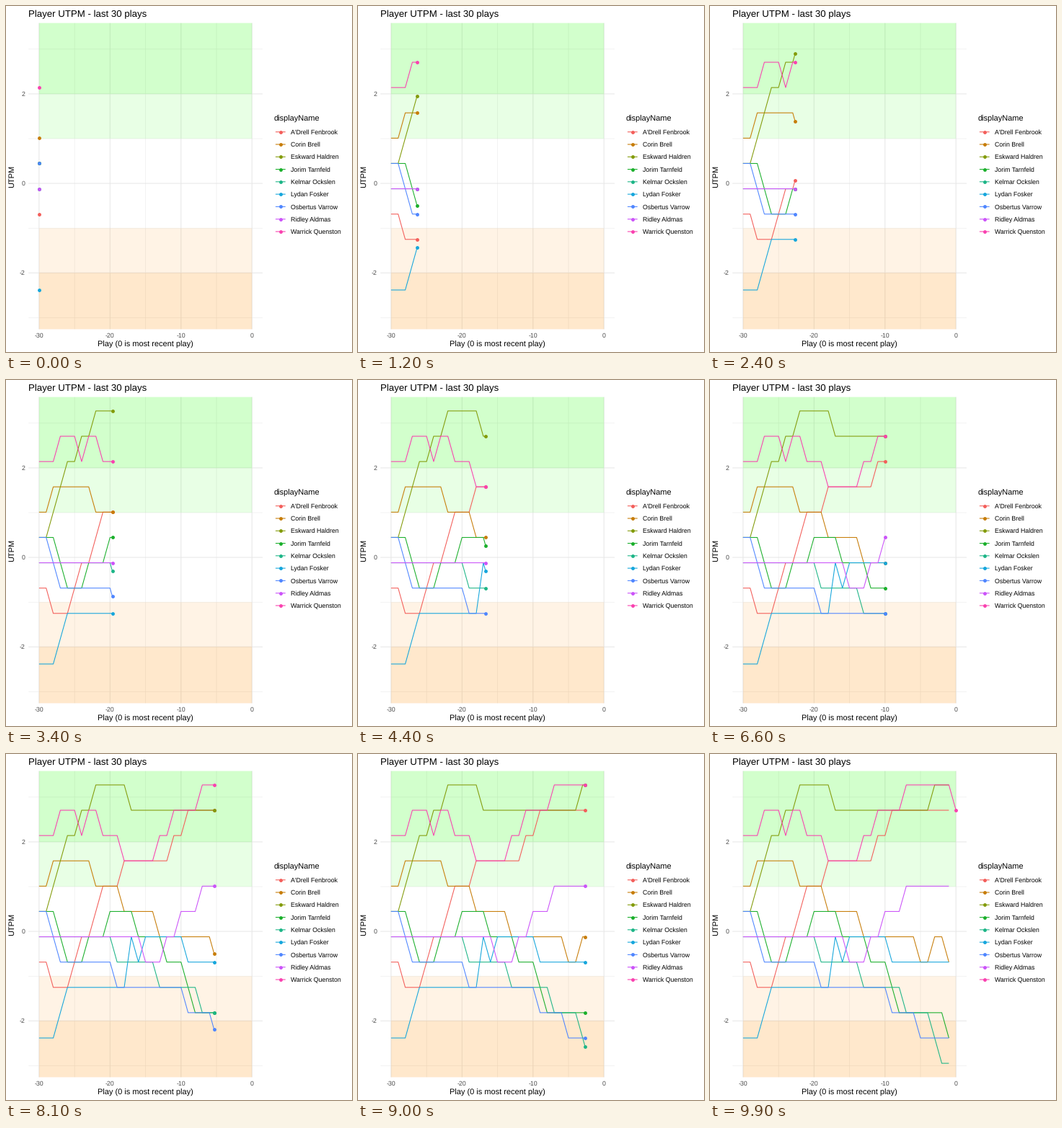
A matplotlib script for the animation above (10000 ms loop, 480 px wide and 480 px high).

```python
import numpy as np
import matplotlib.pyplot as plt
from matplotlib.animation import FuncAnimation
from matplotlib.patches import Rectangle

plt.rcParams["font.family"] = "Liberation Sans"
plt.rcParams["text.hinting"] = "no_hinting"

SIZE, FRAMES, INTERVAL = 480, 100, 100
LEFT, RIGHT, TOP, BOTTOM = 31.1, 356.0, 23.6, 448.4
X_MIN, X_MAX = -31.5, 1.5
BASE, STEP = -0.12, 0.5655
Y_MIN, Y_MAX = BASE - 5.55 * STEP, BASE + 6.55 * STEP
GRID = "#E8E8E8"

# name, colour, starting level, plays with a step up, plays with a step down
PLAYERS = [
    ("A'Drell Fenbrook", "#F35E5A", -1, [-25, -24, -22, -21, -18, -11, -9], [-28]),
    ("Corin Brell", "#C77D09", 2, [-28, -3], [-22, -18, -13, -5, -1]),
    ("Eskward Haldren", "#839B0A", 1, [-28, -27, -26, -24, -22, -3], [-17]),
    ("Jorim Tarnfeld", "#1AAF2B", 1, [-23, -20], [-27, -26, -16, -12, -9, -8, -1]),
    ("Kelmar Ockslen", "#1DB587", 0, [], [-19, -13, -7, -3, -2]),
    ("Lydan Fosker", "#15A6DC", -4, [-27, -26, -17, -17, -15], [-16, -9]),
    ("Osbertus Varrow", "#4F86FF", 1, [], [-28, -27, -19, -9, -5]),
    ("Ridley Aldmas", "#CB53F9", 0, [-12, -10, -7], [-15]),
    ("Warrick Quenston", "#F941AF", 4, [-27, -23, -13, -11, -7], [-24, -21, -18, 0]),
]

PLAYS = np.arange(-30, 1)
# Each play lands on a whole frame; motion is linear in between.
ARRIVAL = np.round((FRAMES - 1) * np.arange(31) / 30)


def px(x):
    return LEFT + (x - X_MIN) / (X_MAX - X_MIN) * (RIGHT - LEFT)


def py(y):
    return BOTTOM - (y - Y_MIN) / (Y_MAX - Y_MIN) * (BOTTOM - TOP)


def scores(start, ups, downs):
    level = start + sum(PLAYS >= u for u in ups) - sum(PLAYS >= d for d in downs)
    return BASE + STEP * level


fig = plt.figure(figsize=(SIZE / 72, SIZE / 72), dpi=72, facecolor="white")
ax = fig.add_axes([0, 0, 1, 1])
ax.set_xlim(0, SIZE)
ax.set_ylim(SIZE, 0)
ax.axis("off")


def stroke(xs, ys, color, width=1.07, z=3):
    line, = ax.plot(xs, ys, color=color, lw=width, zorder=z, snap=False,
                    solid_capstyle="butt", solid_joinstyle="round")
    return line


def dot(xs, ys, color, z=4):
    mark, = ax.plot(xs, ys, "o", color=color, ms=4.9, mew=0, zorder=z, snap=False)
    return mark


def label(x, y, text, size, color="black", ha="left", **kw):
    ax.text(x, y, text, fontsize=size, color=color, ha=ha, va="baseline", **kw)


def draw_grid():
    for xs, ys, width in (((-25, -15, -5), (-3, -1, 1, 3), 0.53),
                          ((-30, -20, -10, 0), (-2, 0, 2), 1.07)):
        for y in ys:
            stroke([LEFT, RIGHT], [py(y)] * 2, GRID, width, 1)
        for x in xs:
            stroke([px(x)] * 2, [TOP, BOTTOM], GRID, width, 1)


def draw_bands():
    green, orange = (0.12, 1, 0), (1, 0.55, 0)
    for low, high, color, alpha in ((2, Y_MAX, green, 0.2), (1, 2, green, 0.1),
                                    (-2, -1, orange, 0.1), (Y_MIN, -2, orange, 0.2)):
        ax.add_patch(Rectangle((px(-30), py(high)), px(0) - px(-30), py(low) - py(high),
                               fc=color, alpha=alpha, lw=0, zorder=2, snap=False))


def draw_text():
    label(31.1, 15, "Player UTPM - last 30 plays", 13.2)
    label(193.5, 473, "Play (0 is most recent play)", 11, ha="center")
    label(13.4, 236, "UTPM", 11, ha="right", rotation=90) if False else ax.text(
        13.6, 236, "UTPM", fontsize=11, rotation=90, ha="right", va="center")
    for x in (-30, -20, -10, 0):
        label(px(x), 460, str(x), 8.8, "#4D4D4D", "center")
    for y in (-2, 0, 2):
        label(26.2, py(y) + 3.1, str(y), 8.8, "#4D4D4D", "right")


def draw_legend():
    label(372, 160, "displayName", 11)
    for i, (name, color, *_) in enumerate(PLAYERS):
        y = 174.7 + 17.28 * i
        stroke([373.9, 387.7], [y, y], color)
        dot([380.8], [y], color)
        label(394.7, y + 3.1, name, 8.8)


draw_grid()
draw_bands()
draw_text()
draw_legend()

tracks = []
for n, (name, color, *moves) in enumerate(PLAYERS):
    last = 30 if n == len(PLAYERS) - 1 else 29
    tracks.append((scores(*moves), last, stroke([], [], color), dot([], [], color)))


def update(frame):
    now = np.interp(frame, ARRIVAL, np.arange(31))
    for ys, last, line, mark in tracks:
        t = min(now, last)
        done = int(t) + 1
        x, y = t - 30, np.interp(t, np.arange(31), ys)
        line.set_data(px(np.append(PLAYS[:done], x)), py(np.append(ys[:done], y)))
        mark.set_data([px(x)], [py(y)])
        mark.set_visible(now <= last)
    return [artist for track in tracks for artist in track[2:]]


anim = FuncAnimation(fig, update, frames=FRAMES, interval=INTERVAL,
                     repeat=True, repeat_delay=0, blit=False)
plt.show()
```
